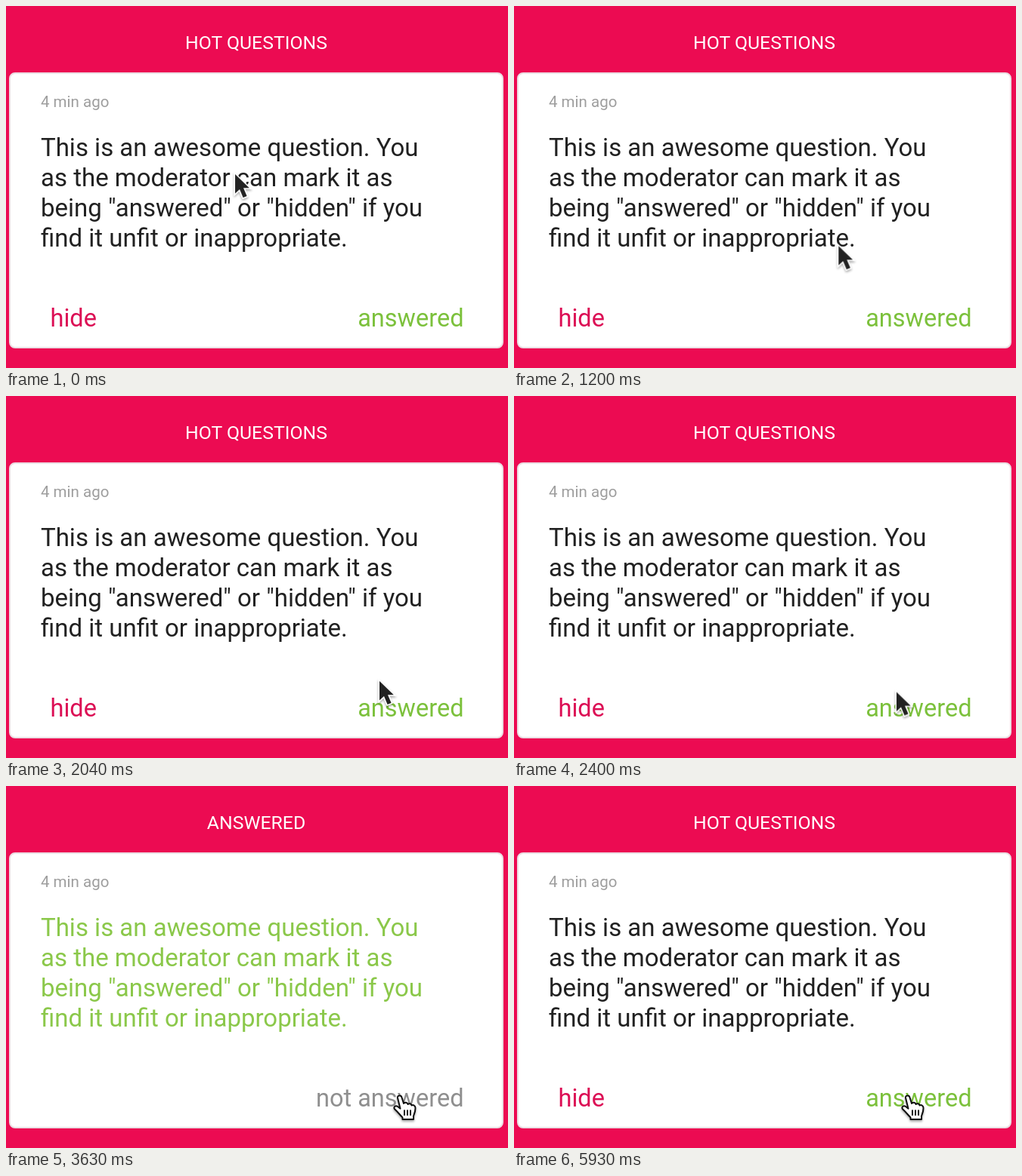
Animation of 664x480 px, one loop 7930 ms. Source, as an HTML page:

```html
<!DOCTYPE html>
<html lang="en">
<head>
<meta charset="utf-8">
<title>Question moderation</title>
<style>
html, body { margin: 0; width: 100%; height: 100%; overflow: hidden; background: #ec0b52; }
svg { display: block; width: 664px; height: 480px; font-family: Roboto, sans-serif; }
.title { font-size: 24.8px; fill: #fff; text-anchor: middle; }
.ago { font-size: 20.5px; fill: #9e9e9e; }
.body { font-size: 33px; fill: #212121; }
.btn { font-size: 32.5px; }
.end { text-anchor: end; }

.body, .open, .done, .ring, .mover, .arrow, .hand { animation: 7930ms infinite; }
.body { animation-name: tint; animation-timing-function: linear; }
.open, .done, .arrow, .hand { animation-timing-function: step-end; }
.open { animation-name: open; }
.done { animation-name: done; }
.arrow { animation-name: arrow; }
.hand { animation-name: hand; }
.ring { animation-name: press; animation-timing-function: linear; }
.mover { animation-name: move; }

@keyframes tint {
  0%, 43.5% { fill: #212121; }
  45.7%, 72.5% { fill: #8bc84a; }
  74.7%, 100% { fill: #212121; }
}
@keyframes open {
  0%, 72.5%, 100% { opacity: 1; }
  43.5% { opacity: 0; }
}
@keyframes done {
  0%, 72.5%, 100% { opacity: 0; }
  43.5% { opacity: 1; }
}
@keyframes arrow {
  0% { opacity: 1; }
  31.78%, 100% { opacity: 0; }
}
@keyframes hand {
  0% { opacity: 0; }
  31.78%, 100% { opacity: 1; }
}
@keyframes press {
  0%, 40.45% { opacity: 0; }
  40.46%, 43.13% { opacity: 1; }
  44.64%, 70.95% { opacity: 0; }
  70.96%, 72.13% { opacity: 1; }
  73.64%, 100% { opacity: 0; }
}
@keyframes move {
  0% { transform: translate(303px, 223px); animation-timing-function: cubic-bezier(.4, .15, .75, .7); }
  15.132% { transform: translate(429px, 318px); animation-timing-function: cubic-bezier(.3, .4, .6, 1); }
  20.429% { transform: translate(506px, 389px); animation-timing-function: ease-in-out; }
  25.725% { transform: translate(494px, 378px); animation-timing-function: ease-in-out; }
  35.5%, 100% { transform: translate(521px, 411px); }
}
</style>
</head>
<body>
<svg viewBox="0 0 664 480">
  <defs>
    <filter id="shade" x="-50%" y="-50%" width="200%" height="200%">
      <feDropShadow dx="0" dy="2" stdDeviation="1.5" flood-color="#000" flood-opacity=".35"/>
    </filter>
  </defs>
  <rect width="664" height="480" fill="#ec0b52"/>
  <rect x="5" y="89" width="652" height="364" rx="7" fill="#fff" stroke="#ebdfe3" stroke-width="2"/>

  <text class="ago" x="46" y="134.3">4 min ago</text>
  <text class="body">
    <tspan x="46" y="199">This is an awesome question. You</tspan>
    <tspan x="46" y="239">as the moderator can mark it as</tspan>
    <tspan x="46" y="279">being "answered" or "hidden" if you</tspan>
    <tspan x="46" y="319">find it unfit or inappropriate.</tspan>
  </text>

  <g class="open">
    <text class="title" x="331" y="56.5">HOT QUESTIONS</text>
    <text class="btn" x="58.5" y="424.5" fill="#dc0f55">hide</text>
    <text class="btn end" x="605.5" y="424.5" fill="#7cc13c">answered</text>
  </g>
  <g class="done">
    <text class="title" x="331" y="56.5">ANSWERED</text>
    <text class="btn end" x="605.5" y="424.5" fill="#8f8f8f">not answered</text>
  </g>

  <g class="ring" fill="none">
    <circle cx="522" cy="410.5" r="60.7" stroke="#fff" stroke-opacity=".8" stroke-width="5"/>
    <circle cx="522" cy="410.5" r="60.7" stroke="#222" stroke-width="2.8"/>
  </g>

  <g class="mover">
    <g class="arrow">
      <path d="M0 0V25.5L6 20L10.6 31L15.6 28.9L11 18.2H18.8Z" fill="#222" stroke="#fff" stroke-width="3" paint-order="stroke" filter="url(#shade)"/>
    </g>
    <g class="hand">
      <g transform="translate(-9 -2)" filter="url(#shade)" stroke="#111" stroke-width="2" stroke-linejoin="round">
        <path fill="#fff" d="M6 4.5C5.5 1 10.5 .5 11.5 4L14 12C15.5 10 19 10.5 19.5 13C21 11.5 24 12 24.5 14.5C26.5 13.5 29.5 14.5 29.5 18C29.5 23 28 26 27 28.5V33H12.5V30.5C9 27 6 23 2.2 19.5C0 17 3 14 6 16L9.5 18.8Z"/>
        <path fill="none" d="M15 20.5V28M19 20.5V28M23 20.5V28"/>
      </g>
    </g>
  </g>
</svg>
</body>
</html>
```
